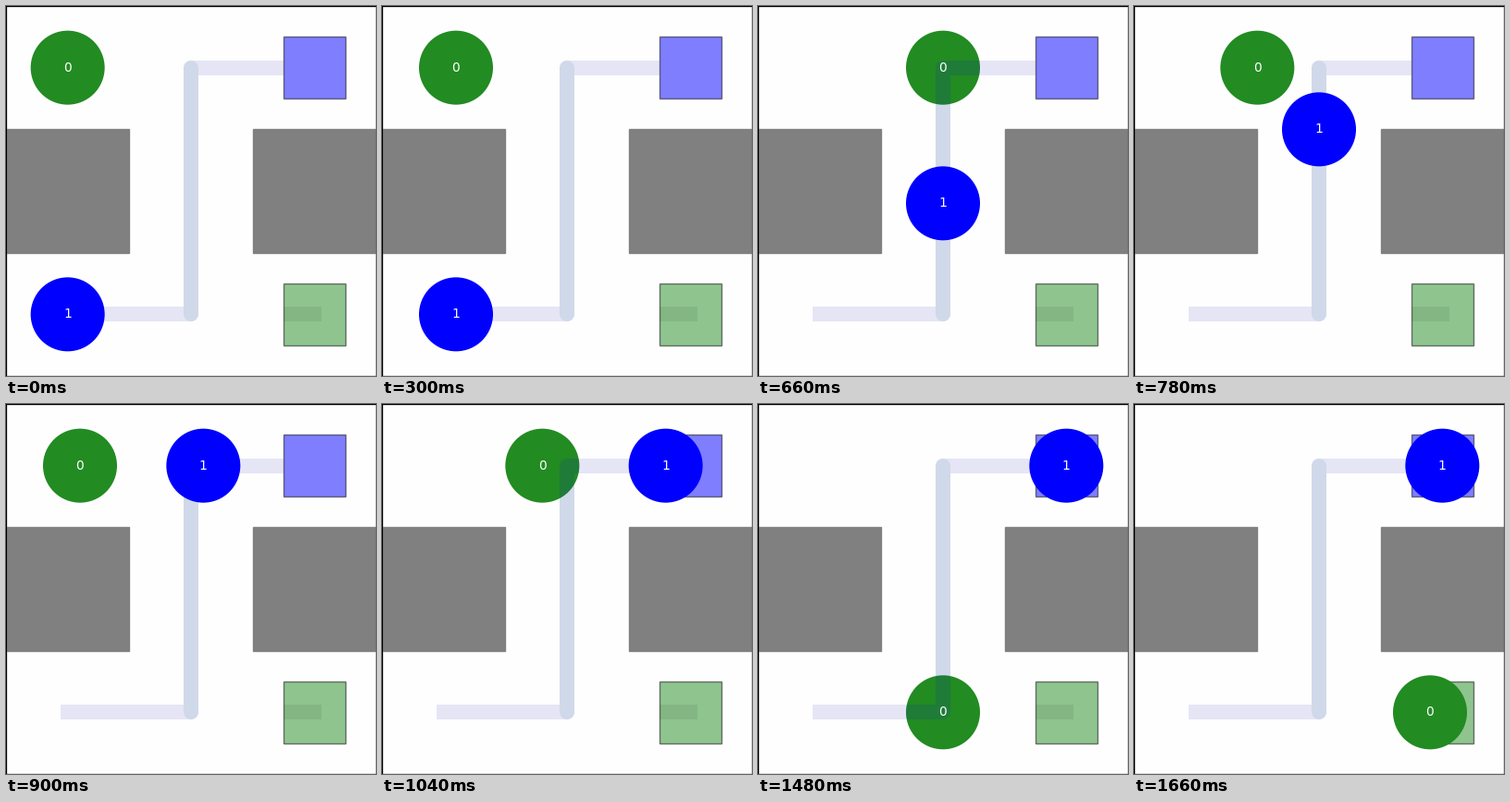
A matplotlib script for the animation above (1680 ms loop, 400 px wide and 400 px high).

```python
import numpy as np
import matplotlib.pyplot as plt
from matplotlib.animation import FuncAnimation
from matplotlib.patches import Circle, Rectangle

SIZE, DPI = 400, 100
FRAMES, INTERVAL = 84, 20
HOLD = 14             # frames to wait before moving
STEPS_PER_CELL = 10
BAR = 16 * 72 / DPI   # corridor width in points
GREEN, BLUE = "forestgreen", "blue"

ROUTES = [
    [(0, 2), (1, 2), (1, 2), (0, 2), (1, 2), (1, 1), (1, 0), (2, 0)],
    [(0, 0), (1, 0), (1, 1), (1, 2), (2, 2)],
]

fig = plt.figure(figsize=(SIZE / DPI, SIZE / DPI), dpi=DPI)
ax = fig.add_axes([0, 0, 1, 1], facecolor="#fefefe")
ax.set(xlim=(-0.5, 2.5), ylim=(-0.5, 2.5), xticks=[], yticks=[])


def box(x, y, size, **style):
    corner = (x - size / 2, y - size / 2)
    ax.add_patch(Rectangle(corner, size, size, **style))


def bar(points, color, cap="butt", **style):
    xs, ys = zip(*points)
    return ax.plot(xs, ys, color=color, lw=BAR, solid_capstyle=cap,
                   solid_joinstyle="round", **style)[0]


box(1, 1, 3, facecolor="none", edgecolor="gray")
for x in (0, 2):
    box(x, 1, 1, facecolor="gray", edgecolor="gray")

# Route of agent 1, and the stretch that both agents share
bar([(-0.06, 0), (1, 0), (1, 2), (1.75, 2)], "#e5e5f6", zorder=1.1)
bar([(1, 0), (1, 2)], "#d0d9e9", cap="round", zorder=1.2)

for x, y, color in ((2, 0, GREEN), (2, 2, BLUE)):
    box(x, y, 0.5, facecolor=color, edgecolor="black", alpha=0.5, zorder=1.5)
bar([(1.75, 0), (2.06, 0)], "#234623", alpha=0.11, zorder=1.6)

agents, labels = [], []
for i, (route, color) in enumerate(zip(ROUTES, (GREEN, BLUE))):
    agents.append(ax.add_patch(Circle(route[0], 0.3, fc=color, lw=0, zorder=5)))
    labels.append(ax.text(*route[0], str(i), color="white", fontsize=10,
                          family="DejaVu Sans", ha="center", va="center",
                          zorder=7))

# Blue route showing through the green agent
tint = bar(ROUTES[1], BLUE, alpha=0.1, zorder=6)


def position(route, step):
    xs, ys = zip(*route)
    t = step / STEPS_PER_CELL
    stops = np.arange(len(route))
    return np.interp(t, stops, xs), np.interp(t, stops, ys)


def update(frame):
    step = max(0, frame - HOLD)
    for agent, label, route in zip(agents, labels, ROUTES):
        spot = position(route, step)
        agent.center = spot
        label.set_position(spot)
    tint.set_clip_path(agents[0])
    return [*agents, *labels, tint]


anim = FuncAnimation(fig, update, frames=FRAMES, interval=INTERVAL,
                     repeat=True, repeat_delay=0)
plt.show()
```
